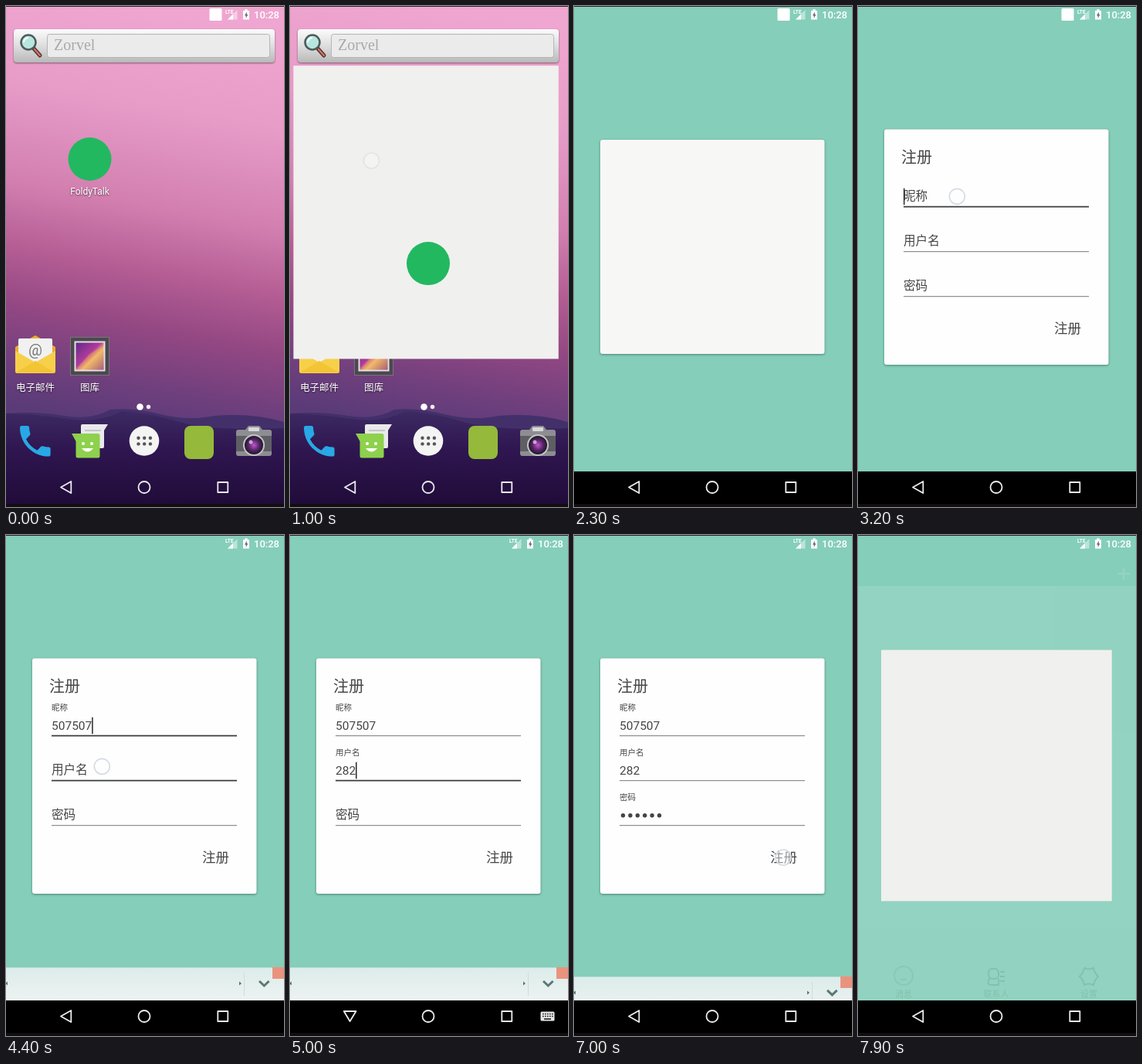
Animation of 360x648 px, one loop 8 s. Source, as an HTML page:

```html
<!DOCTYPE html>
<html lang="zh-CN">
<head>
<meta charset="utf-8">
<title>Sign-up flow</title>
<style>
  html, body { margin: 0; width: 100%; height: 100%; overflow: hidden; background: #000; }
  svg { display: block; width: 100%; height: 100%; }
  text { font-family: Roboto, "Noto Sans CJK SC", "Noto Sans CJK JP", sans-serif; white-space: pre; }
  .card { filter: drop-shadow(0 1px 1.5px rgba(0, 40, 30, .45)); }
  .tag { fill: #fff; font-size: 12.5px; text-anchor: middle; filter: drop-shadow(0 1px 1px rgba(0, 0, 0, .6)); }
  .form text { fill: #444; }
</style>
</head>
<body>
<svg id="stage" viewBox="0 0 360 648">
  <defs>
    <linearGradient id="sky" x1=".55" y1="0" x2=".45" y2="1">
      <stop offset="0" stop-color="#efa6d0"/><stop offset=".2" stop-color="#e79cc8"/>
      <stop offset=".4" stop-color="#d27fb0"/><stop offset=".53" stop-color="#b45d94"/>
      <stop offset=".64" stop-color="#944883"/><stop offset=".76" stop-color="#6f3f7d"/>
      <stop offset=".84" stop-color="#5a3b78"/>
    </linearGradient>
    <linearGradient id="hill" x1="0" y1="0" x2="0" y2="1">
      <stop offset="0" stop-color="#3d2a63"/><stop offset=".4" stop-color="#2f1650"/><stop offset="1" stop-color="#1f0b38"/>
    </linearGradient>
    <linearGradient id="metal" x1="0" y1="0" x2="0" y2="1">
      <stop offset="0" stop-color="#fbfbfb"/><stop offset=".5" stop-color="#dedede"/><stop offset="1" stop-color="#b9b9b9"/>
    </linearGradient>
    <linearGradient id="photo" x1="0" y1="0" x2="1" y2="1">
      <stop offset="0" stop-color="#5a2a86"/><stop offset=".45" stop-color="#b03a9c"/>
      <stop offset=".6" stop-color="#f3c37a"/><stop offset="1" stop-color="#7a2d8c"/>
    </linearGradient>
    <linearGradient id="imeFill" x1="0" y1="0" x2="0" y2="1">
      <stop offset="0" stop-color="#dcecea"/><stop offset="1" stop-color="#edf3f2"/>
    </linearGradient>
    <radialGradient id="lens">
      <stop offset="0" stop-color="#c05ac8"/><stop offset=".55" stop-color="#5c2470"/><stop offset="1" stop-color="#1e1a22"/>
    </radialGradient>
    <clipPath id="appArea"><rect width="360" height="602"/></clipPath>
  </defs>

  <g id="home">
    <rect width="360" height="648" fill="url(#sky)"/>
    <path d="M0 527Q40 524 75 530T135 522Q165 519 200 528T270 530Q320 526 360 538V648H0Z" fill="#43306b"/>
    <path d="M0 527Q40 528 80 534T150 524Q185 526 225 538T360 546V648H0Z" fill="url(#hill)"/>
    <g filter="drop-shadow(0 1px 1px rgba(0,0,0,.45))">
      <rect x="10" y="30" width="338" height="43" rx="4" fill="url(#metal)"/>
    </g>
    <rect x="53.5" y="36.5" width="288" height="30" rx="3" fill="#ebebeb" stroke="#b5b5b5"/>
    <path d="M36 55L44 64" stroke="#4c2c2a" stroke-width="5" stroke-linecap="round"/>
    <path d="M37 56L44 64" stroke="#cf7566" stroke-width="2.5" stroke-linecap="round"/>
    <circle cx="29" cy="47" r="9.5" fill="#b8e6de" stroke="#4d5a5c" stroke-width="2.5"/>
    <path d="M23 47a6 6 0 0 1 6-6" fill="none" stroke="#f4fffd" stroke-width="2"/>
    <text x="62" y="57" font-size="20" style="font-family:'Liberation Serif',serif" fill="#a9a9a9">Zorvel</text>

    <circle cx="108.5" cy="198" r="28" fill="#22b860"/>
    <text class="tag" x="108.5" y="244" style="font-size:12px">FoldyTalk</text>

    <path d="M12 441L38 426L64 441V472a3 3 0 0 1-3 3H15a3 3 0 0 1-3-3Z" fill="#e9ad2c"/>
    <rect x="16" y="430" width="44" height="34" rx="2" fill="#f1f1f1"/>
    <text x="38" y="452" font-size="20" text-anchor="middle" fill="#777">@</text>
    <path d="M12 446L38 461L64 446V472a3 3 0 0 1-3 3H15a3 3 0 0 1-3-3Z" fill="#f7d04a"/>
    <path d="M13 474L38 459L63 474Z" fill="#f3c535"/>
    <text class="tag" x="38" y="498">电子邮件</text>

    <rect x="83" y="428" width="51" height="50" fill="#4b494d"/>
    <rect x="83.5" y="428.5" width="50" height="49" fill="none" stroke="#77757a"/>
    <rect x="89.500" y="434.5" width="38" height="37" fill="url(#photo)" stroke="#e6dfe6" stroke-width="2"/>
    <path d="M91 470L108 450L126 440V470Z" fill="#f0a848" opacity=".35"/>
    <text class="tag" x="108.5" y="498">图库</text>

    <circle cx="173.500" cy="518.5" r="4.3" fill="#fff"/>
    <circle cx="184.500" cy="518.5" r="2.7" fill="#eee"/>

    <path transform="translate(11.400 536.4) scale(2.2)" fill="#29a8e6" d="M6.62 10.79c1.44 2.83 3.76 5.14 6.59 6.59l2.2-2.2c.27-.27.67-.36 1.02-.24 1.12.37 2.33.57 3.57.57.55 0 1 .45 1 1V20c0 .55-.45 1-1 1-9.39 0-17-7.61-17-17 0-.55.45-1 1-1h3.5c.55 0 1 .45 1 1 0 1.25.2 2.45.57 3.57.11.35.03.74-.25 1.02l-2.2 2.2z"/>
    <path d="M97 543a2 2 0 0 1 2-2H132L127 549V570a2 2 0 0 1-2 2H97Z" fill="#e9e9ec"/>
    <path d="M102 549H123" stroke="#c5c5ca" stroke-width="2"/>
    <path d="M85 553H119a2.500 2.500 0 0 1 2.500 2.500V582a2.500 2.500 0 0 1-2.500 2.500H93a2.500 2.500 0 0 1-2.500-2.500V563Z" fill="#8ed14c"/>
    <circle cx="100" cy="566" r="2" fill="#fff"/><circle cx="111" cy="566" r="2" fill="#fff"/>
    <path d="M98 572q7.500 9 15 0Z" fill="#fff"/>
    <circle cx="179" cy="562.5" r="19.3" fill="#f4f4f4"/>
    <g id="drawerDots" fill="#555"></g>
    <rect x="231" y="543" width="38" height="43" rx="8" fill="#94b93b"/>
    <path d="M298 551q0-3 3-3h9l4-5h14l4 5h9q3 0 3 3v28q0 3-3 3h-40q-3 0-3-3Z" fill="#8d8d92"/>
    <path d="M298 556h46v20h-46Z" fill="#5f5e64"/>
    <rect x="314" y="545" width="14" height="5" rx="1" fill="#d9d9dc"/>
    <circle cx="321" cy="568" r="14" fill="#c4c4c8"/><circle cx="321" cy="568" r="12" fill="url(#lens)"/>
    <circle cx="317" cy="564" r="2.5" fill="#f0d5f4" opacity=".7"/>
  </g>

  <g clip-path="url(#appArea)">
    <rect id="teal" width="360" height="602" fill="#85ceb9"/>
    <g id="main" opacity=".12">
      <rect y="66" width="360" height="536" fill="#f3f3f1"/>
      <path d="M344 42V58M336 50H352" stroke="#fff" stroke-width="2.5"/>
      <g fill="none" stroke="#666" stroke-width="2">
        <circle cx="59" cy="570" r="12" stroke="#9aa"/><path d="M55 575h8" stroke="#9aa"/>
        <rect x="169" y="561" width="13" height="13" rx="5"/><path d="M170 574q-4 8 3 8h9v-8M184 565h6M184 571h6M184 577h6"/>
        <path d="M293 560q6 3 12 0q1 6 6 11q-5 5-6 11q-6-3-12 0q-1-6-6-11q5-5 6-11Z"/>
      </g>
      <g font-size="11" text-anchor="middle" fill="#666">
        <text x="59" y="598">消息</text><text x="179" y="598">联系人</text><text x="299" y="598">设置</text>
      </g>
    </g>
    <rect id="card" class="card" rx="3"/>
    <g id="login" class="form">
      <text x="56" y="229.5" font-size="20">欢迎回来</text>
      <text x="59" y="278.5" font-size="15.6">用户名</text>
      <text x="59" y="336.5" font-size="15.6">密码</text>
      <path d="M59 286.500H299M59 344.500H299" stroke="#666"/>
      <text x="60" y="380.500" font-size="15">注册成为新用户</text>
      <text x="266" y="408.500" font-size="18">登录</text>
    </g>
    <g id="register" class="form">
      <text x="56" y="202.500" font-size="20">注册</text>
      <g id="fields"></g>
      <text x="254" y="423" font-size="17.5">注册</text>
    </g>
    <g id="ime">
      <rect y="559.5" width="360" height="43" fill="url(#imeFill)"/>
      <path d="M308.500 566V596" stroke="#cfdcda"/>
      <path d="M2 577.500V582.500L-1 580ZM302 577.500V582.500L305 580Z" fill="#56706f"/>
      <path d="M328 577L334.300 583L340.600 577" fill="none" stroke="#5a7876" stroke-width="3"/>
      <rect x="345" y="559" width="15" height="15" fill="#e9937e"/>
    </g>
    <g id="splash">
      <rect id="splashBox" fill="#f0f0ee"/>
      <circle id="splashLogo" cx="179" r="28" fill="#22b860"/>
    </g>
  </g>
  <circle id="touch" r="10" fill="#fff" fill-opacity=".45" stroke="#d6dce4" stroke-width="1.7"/>

  <rect id="navFill" y="602" width="360" height="46" fill="#000"/>
  <g fill="none" stroke="#ececec" stroke-width="1.8" stroke-linejoin="round">
    <path id="back"/>
    <circle cx="179" cy="622.5" r="7.5"/>
    <rect x="274.300" y="616" width="13" height="13"/>
  </g>
  <g id="kbd">
    <rect x="324.500" y="616.5" width="18" height="12" rx="1.5" fill="#e6e6e6"/>
    <path d="M327 619.500H341M327 622.500H341" stroke="#111" stroke-width="1.6" stroke-dasharray="1.6 1.4"/>
    <path d="M329 626H338" stroke="#111" stroke-width="1.5"/>
  </g>
  <g id="status" fill="#fff">
    <rect id="notice" x="263.500" y="3" width="16" height="16" rx="1.5"/>
    <text x="284" y="10" font-size="6.5" font-weight="700" textLength="">LTE</text>
    <path d="M299.500 5V17.500H287Z" opacity=".45"/><path d="M294 10.500V17.500H287Z"/>
    <path d="M307 6h2.300V4.300h3.400V6H315V17.500H307Z"/>
    <path d="M311.800 7.500L309 12.500H310.700V16L313.300 11H311.800Z" fill="#667"/>
    <text x="321" y="16" font-size="13" font-weight="500">10:28</text>
  </g>
  <rect width="360" height="1" fill="#2a2226"/>
  <rect y="644" width="360" height="4" fill="#120e10"/>
</svg>
<script>
const LOOP = 8000, STEP = 100;
const $ = id => document.getElementById(id);
const set = (id, attrs) => { for (const k in attrs) $(id).setAttribute(k, attrs[k]); };
const show = (id, alpha) => set(id, { opacity: +alpha });
const clamp = v => Math.max(0, Math.min(1, v));
const lerp = (a, b, p) => a + (b - a) * p;
const span = (t, a, b) => clamp((t - a) / (b - a));
const ease = p => p * p * (3 - 2 * p);
const within = (t, a, b) => t >= a && t < b;
const box = (id, l, t, r, b) => set(id, { x: l, y: t, width: r - l, height: b - t });

const TAPS = [
  { x: 105.5, y: 200, from: 100, to: 1100, fade: 900 },
  { x: 112, y: 375, from: 1900, to: 2200, fade: 2000 },
  { x: 128.3, y: 246.3, from: 3200, to: 3500, fade: 3200 },
  { x: 124.3, y: 299.3, from: 4300, to: 4700, fade: 4400 },
  { x: 84, y: 363, from: 5700, to: 6100, fade: 5750 },
  { x: 271, y: 417, from: 6900, to: 7200, fade: 7000 }
];

// typed: [time, number of characters]
const FIELDS = [
  { label: "昵称", row: 259.7, value: "507507", glyph: 8.7, focus: 3200, blur: 4500, float: 3200,
    typed: [[3500, 1], [3600, 2], [3700, 3], [3900, 5], [4000, 6]] },
  { label: "用户名", row: 317.7, value: "282", glyph: 8.7, focus: 4400, blur: 5800, float: 4400,
    typed: [[4700, 1], [4800, 2], [5000, 3]] },
  { label: "密码", row: 375.7, value: "••••••", glyph: 9.4, focus: 5800, blur: 7000, float: 5860,
    typed: [[6100, 1], [6200, 2], [6300, 4], [6500, 6]] }
];

function fieldMarkup(f, t) {
  const p = ease(span(t, f.float, f.float + 200));
  const count = f.typed.reduce((n, [at, c]) => t >= at ? c : n, 0);
  const active = within(t, f.focus, f.blur);
  const caretOn = within(t, f.focus + (f.focus === 4400 ? 100 : 0), f.blur) && !within(t, 5500, 5700);
  const x = 59.7 + count * f.glyph;
  const glyphs = f.value[0] === "•"
    ? [...Array(count).keys()].map(i => `<circle cx="${63.5 + i * f.glyph}" cy="${f.row - 13}" r="2.7" fill="#444"/>`).join("")
    : `<text x="59" y="${f.row - 7.7}" font-size="15.5">${f.value.slice(0, count)}</text>`;
  return `<text x="59" y="${f.row - lerp(8.4, 32.5, p)}" font-size="${lerp(15.6, 10.5, p)}">${f.label}</text>${glyphs}
    <path d="M59 ${f.row}H299" stroke="${active ? "#3c3c3c" : "#777"}" stroke-width="${active ? 1.8 : 1}"/>
    ${caretOn ? `<path d="M${x} ${f.row - 24}v21.500" stroke="#333" stroke-width="1.6"/>` : ""}`;
}

function drawLaunch(t) {
  const i = clamp((t - 600) / 600) * 6;
  const wide = [0, .04, .22, .62, .945, 1, 1][i | 0];
  const tall = [0, .02, .08, .25, .546, .88, 1][i | 0];
  box("splashBox", lerp(81, 0, wide), lerp(170, 0, tall), lerp(137, 360, wide), lerp(226, 648, tall));
  set("splashLogo", { cy: lerp(344, 324, tall) });
  show("splash", within(t, 700, 1400) ? (t >= 1300 ? .45 : 1) : 0);
  show("splashLogo", t >= 900);
}

function drawCard(t) {
  const p = ease(span(t, 2100, 2500));
  const leaving = t >= 7900;
  if (leaving) box("card", 30, 148.7, 328.7, 473.5);
  else box("card", 34, lerp(186.5, 159.500, p), 324.500, lerp(436, 464, p));
  const shade = (a, b) => Math.round(lerp(a, b, p));
  set("card", {
    fill: leaving ? "#f0f0ee" : `rgb(${shade(240, 254)},${shade(240, 254)},${shade(238, 254)})`,
    rx: leaving ? 0 : 3, class: leaving ? "" : "card"
  });
  show("card", t >= 1300);
  show("login", t >= 1300 ? 1 - span(t, 2000, 2300) : 0);
  show("register", leaving ? 0 : span(t, 2300, 2600));
}

function drawKeyboard(t) {
  const up = ease(span(t, 3200, 3600)) - ease(span(t, 6900, 7200));
  set("ime", { transform: `translate(0 ${(1 - up) * 46})` });
  const open = within(t, 3400, 7000) && !within(t, 4400, 4500) && !within(t, 5800, 5900);
  show("kbd", open);
  set("back", { d: open ? "M69.800 616H85.500L77.600 629Z" : "M71 622.500L84.300 615V630Z" });
}

function drawTouch(t) {
  const tap = TAPS.find(a => within(t, a.from, a.to));
  show("touch", tap ? 1 - span(t, tap.fade, tap.to) * .9 : 0);
  if (tap) set("touch", { cx: tap.x, cy: tap.y });
}

function render(ms) {
  const t = Math.floor(ms / STEP) * STEP;
  show("home", t < 1300);
  show("teal", t >= 1300);
  show("main", t >= 7900 ? .12 : 0);
  show("navFill", t >= 1100);
  show("status", !within(t, 700, 1300));
  show("notice", t < 3400);
  drawLaunch(t);
  drawCard(t);
  $("fields").innerHTML = FIELDS.map(f => fieldMarkup(f, t)).join("");
  drawKeyboard(t);
  drawTouch(t);
}

$("drawerDots").innerHTML = [0, 1, 2, 3, 4, 5].map(i =>
  `<circle cx="${171.5 + i % 3 * 7.7}" cy="${558.700 + (i / 3 | 0) * 7.7}" r="2.2"/>`).join("");
document.querySelector("[textLength]").removeAttribute("textLength");

const start = performance.now();
(function tick() {
  render((performance.now() - start) % LOOP);
  requestAnimationFrame(tick);
})();
</script>
</body>
</html>
```
